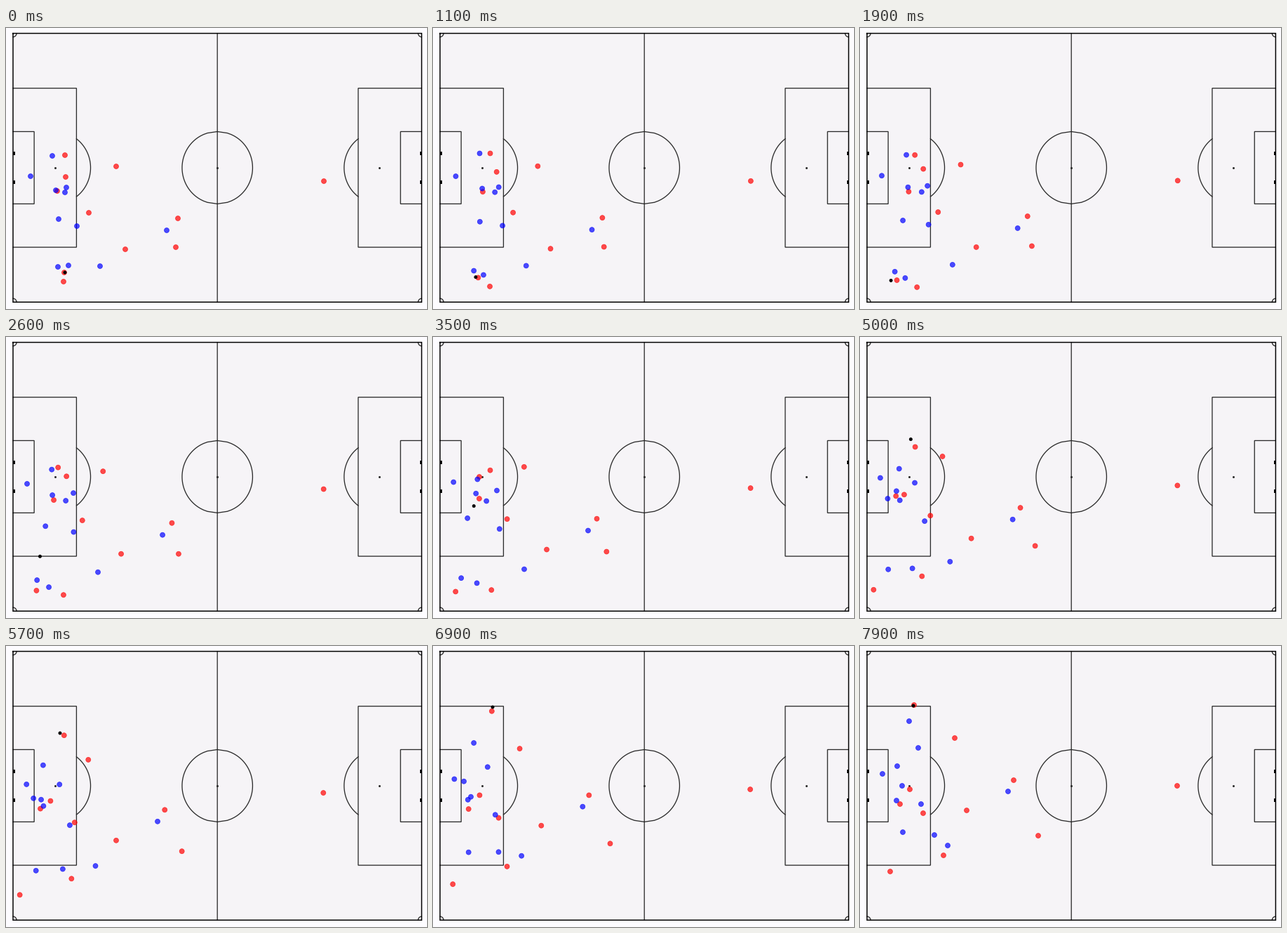
These frames come from a looping animation (600x400 px, 8000 ms). A matplotlib script:

```python
import numpy as np
import matplotlib.pyplot as plt
from matplotlib.animation import FuncAnimation
from matplotlib.patches import Rectangle

W, H, DPI = 600, 400, 100
FRAMES, STEP = 80, 100
PX = 72 / DPI  # points per pixel

LEFT, RIGHT, TOP, BOTTOM = 10.0, 592.4, 7.6, 390.2
CX, CY = (LEFT + RIGHT) / 2, (TOP + BOTTOM) / 2
SX, SY = (RIGHT - LEFT) / 106, (BOTTOM - TOP) / 68
YARD = 0.9144
INK = "#2a2a2a"
RED, BLUE, BLACK = (1, 0, 0, 0.7), (0, 0, 1, 0.7), (0, 0, 0, 1)

fig = plt.figure(figsize=(W / DPI, H / DPI), dpi=DPI, facecolor="#fdfcff")
ax = fig.add_axes([0, 0, 1, 1])
ax.set_xlim(0, W)
ax.set_ylim(H, 0)
ax.axis("off")


# ---- pitch, in metres from the centre spot ----
def px(x, y):
    return CX + np.asarray(x) * SX, CY + np.asarray(y) * SY


def line(x, y, width=1.3, color=INK):
    ax.plot(*px(x, y), color=color, lw=width * PX, snap=False, zorder=1,
            solid_joinstyle="miter")


def spot(x):
    ax.scatter(*px(x, 0), s=(3 * PX) ** 2, c=INK, lw=0, zorder=1)


def box(side, depth, width):
    d, w = depth * YARD, width * YARD / 2
    line([side * 53, side * (53 - d), side * (53 - d), side * 53],
         [-w, -w, w, w])


def draw_pitch():
    ax.add_patch(Rectangle((LEFT, TOP), RIGHT - LEFT, BOTTOM - TOP,
                           fc="#f6f4f7", lw=0, zorder=0))
    line([0, 0], [-34, 34])
    spot(0)
    u, v = np.linspace(-1, 1, 50), np.linspace(0, 1, 50)
    r, penalty = 10 * YARD, 53 - 12 * YARD
    for side in (-1, 1):
        line(side * r * np.sqrt(1 - u ** 2), r * u)
        box(side, 18, 44)
        box(side, 6, 20)
        spot(side * penalty)
        y = 8 * YARD * u
        line(side * (penalty - np.sqrt(r ** 2 - y ** 2)), y)
        for end in (-1, 1):
            line(side * (53 - YARD * np.sqrt(1 - v ** 2)),
                 end * (34 - YARD * v))
            gx, gy = px(side * 53, end * 4 * YARD)
            ax.add_patch(Rectangle((gx - 2.6 * (side > 0), gy - 2.3),
                                   2.6, 4.6, fc="k", lw=0, zorder=1))
    line([-53, 53, 53, -53, -53], [-34, -34, 34, 34, -34], 1.5, "k")


# ---- movement ----
FRAME = np.arange(FRAMES)
U = FRAME / (FRAMES - 1)


def run(*points):
    """Smooth path through points spread evenly over the loop."""
    p = np.array(points, float)
    n = len(p) - 1
    m = np.gradient(p, axis=0, edge_order=2)
    i = np.minimum((U * n).astype(int), n - 1)
    s = (U * n - i)[:, None]
    return ((1 + 2 * s) * (1 - s) ** 2 * p[i] + s * (1 - s) ** 2 * m[i]
            + s * s * (3 - 2 * s) * p[i + 1] - s * s * (1 - s) * m[i + 1])


def drift(x0, y0, x1, y1):
    """Steady sideways walk that picks up speed up the pitch."""
    return np.column_stack([x0 + (x1 - x0) * U, y0 + (y1 - y0) * U ** 2.3])


home = [
    drift(118, 263, 90, 238),
    drift(245, 271, 219, 191),
    drift(242, 312, 254, 270),
    drift(170, 315, 152, 234),
    drift(453, 218, 452, 199),
    run((84, 181), (74, 186), (50, 229), (57, 225)),
    run((85, 212), (91, 202), (83, 194), (78, 165), (85, 105), (77, 84)),
    run((157, 197), (138, 191), (117, 167), (135, 131)),
    run((73, 232), (68, 232), (63, 223), (71, 204)),
    run((83, 348), (43, 361), (19, 358), (43, 321)),
    run((82, 361), (82, 367), (90, 337), (119, 298)),
]
away = [
    drift(101, 282, 87, 225),
    drift(229, 288, 211, 207),
    drift(134, 339, 125, 284),
    run((35, 211), (29, 205), (32, 182)),
    run((66, 182), (66, 181), (62, 204), (53, 164), (70, 107)),
    run((71, 231), (66, 225), (51, 219), (52, 220)),
    run((86, 227), (96, 222), (77, 204), (83, 145)),
    run((84, 234), (85, 233), (55, 231), (60, 199)),
    run((75, 272), (56, 269), (39, 225), (53, 171)),
    run((74, 340), (44, 346), (41, 327), (61, 265)),
    run((89, 338), (61, 356), (77, 325), (106, 269)),
]

# The ball travels straight between touches.
touches = [0, 20, 45, 69, 79]
ball = np.column_stack([np.interp(FRAME, touches, [84, 42, 69, 85, 76]),
                        np.interp(FRAME, touches, [348, 360, 161, 87, 85])])

draw_pitch()
paths = np.array(home + away + [ball])
colors = [RED] * len(home) + [BLUE] * len(away) + [BLACK]
sizes = [(7 * PX) ** 2] * (len(paths) - 1) + [(4.2 * PX) ** 2]
dots = ax.scatter(*paths[:, 0].T, s=sizes, c=colors, edgecolors=colors,
                  linewidths=0.7 * PX, zorder=3)


def update(i):
    dots.set_offsets(paths[:, i])
    return (dots,)


anim = FuncAnimation(fig, update, frames=FRAMES, interval=STEP,
                     repeat=True, repeat_delay=0)
plt.show()
```
